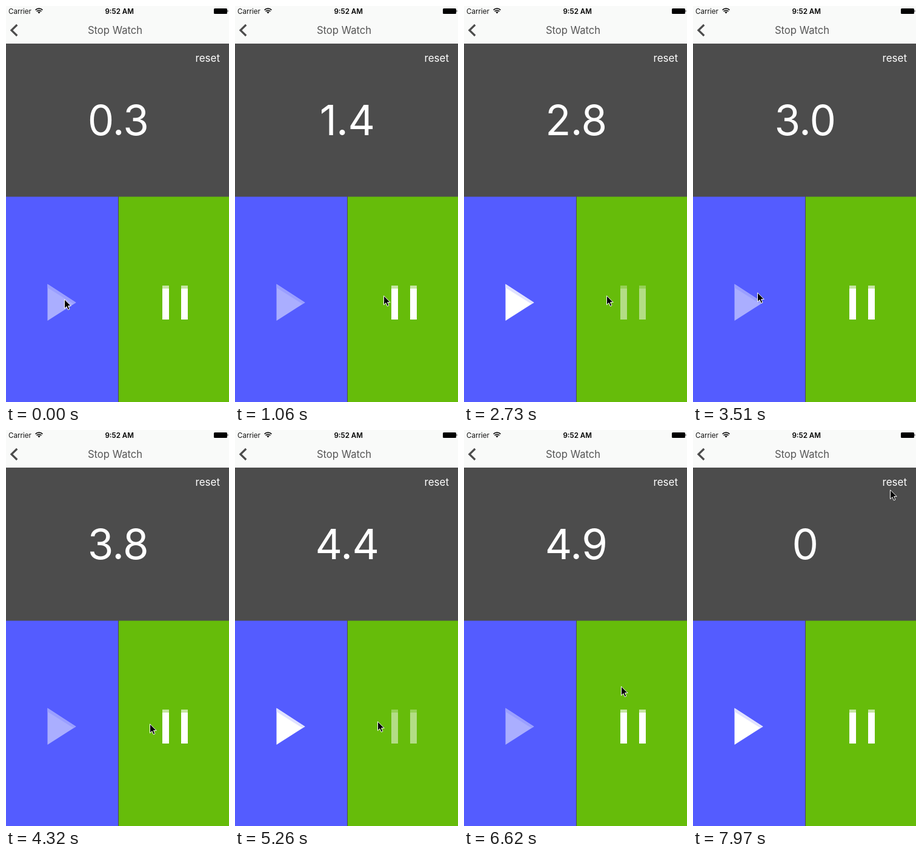
An HTML page that plays this animation: 368x653 px, repeating every 8 s.

```html
<!DOCTYPE html>
<html lang="en">
<head>
<meta charset="utf-8">
<title>Stop Watch</title>
<style>
  html, body { margin: 0; width: 100%; height: 100%; overflow: hidden; background: #4c4c4c; }
  svg { display: block; width: 100vw; height: 100vh; }
  text { font-family: Inter, Roboto, sans-serif; }
  .mid { text-anchor: middle; }
</style>
</head>
<body>
<svg viewBox="0 0 368 653" preserveAspectRatio="none">
  <rect width="368" height="653" fill="#4c4c4c"/>
  <rect width="368" height="62" fill="#f9faf9"/>

  <!-- status bar -->
  <text x="4" y="12.8" font-size="11.6" fill="#111">Carrier</text>
  <g fill="none" stroke="#111" stroke-width="1.7">
    <path d="M48.6 6.6a8.4 8.4 0 0 1 11.8 0M50.6 8.9a5.5 5.5 0 0 1 7.8 0"/>
    <path d="M52.3 10.3a3.2 3.2 0 0 1 4.4 0L54.5 12.6z" fill="#111" stroke="none"/>
  </g>
  <text class="mid" x="187.2" y="12.6" font-size="11.6" font-weight="600">9:52 AM</text>
  <rect x="343" y="4" width="22" height="9" rx="1.5"/>
  <path d="M365.6 6.5q2 1.8 0 3.6z"/>

  <!-- navigation bar -->
  <path d="M18.3 31L9 40L18.3 49" fill="none" stroke="#4c4c4c" stroke-width="3.2"/>
  <text class="mid" x="180" y="46" font-size="16.6" fill="#555">Stop Watch</text>

  <text x="353" y="92" font-size="17" fill="#fff" text-anchor="end">reset</text>
  <text id="count" class="mid" x="185" y="212.5" font-size="69" letter-spacing="-.6" fill="#fff"></text>

  <!-- buttons -->
  <rect y="314.5" width="185" height="338.5" fill="#545cff"/>
  <rect x="186" y="314.5" width="182" height="338.5" fill="#66bc0a"/>
  <g id="play">
    <path d="M68.5 458.5L115.5 489L68.5 519z" fill="#fff"/>
    <path d="M68.5 458.5L115.5 489L111.5 491.5L68.5 464.5z" fill="#e0e2ff"/>
  </g>
  <g id="pause">
    <path d="M258 461h11v56h-11zM289 461h11v56h-11z" fill="#fff"/>
    <path d="M258 461h11v5h-11zM289 461h11v5h-11z" fill="#c6e6a3"/>
  </g>

  <path id="cursor" d="M.5 .8V15.8L4 12.6L6.3 18L8.9 16.9L6.6 11.6H11.2z"
        stroke="#fff" stroke-linejoin="round"/>
</svg>
<script>
const LOOP = 8000, RESET = 7710;
const TICK = 99, LAG = 160; // ms per tenth, and from a press to its first tick
const el = id => document.getElementById(id);
const count = el("count"), play = el("play"), pause = el("pause"), cursor = el("cursor");

// Times of play and pause
const runs = [[-409, 2440], [3240, 4980], [6060, 6860]];

// Pointer moves: start, end, x, y
const home = [96, 483];
const moves = [
  [500, 850, 276, 479], [940, 1055, 245, 477],
  [2690, 2940, 106, 472], [3930, 4400, 248, 485],
  [5240, 5260, 235, 480], [5260, 5650, 118, 319], [5650, 5850, 107, 335],
  [6350, 6610, 259, 422],
  [6900, 7200, 336, 115], [7200, 7410, 325, 98]
];

const clamp = k => Math.min(1, Math.max(0, k));
const ease = k => k * k * (3 - 2 * k);

function tenths(t) {
  if (t >= RESET) return 0;
  return runs.reduce((sum, [on, off]) =>
    sum + Math.max(0, Math.floor((Math.min(t, off) - on - LAG) / TICK) + 1), 0);
}

function pointer(t) {
  return moves.reduce(([px, py], [from, to, x, y]) => {
    const k = ease(clamp((t - from) / (to - from)));
    return [px + (x - px) * k, py + (y - py) * k];
  }, home).map(Math.round);
}

function draw(t) {
  const n = tenths(t), running = runs.some(([on, off]) => t >= on && t < off);
  count.textContent = n ? (n / 10).toFixed(1) : "0";
  play.setAttribute("opacity", running ? .5 : 1);
  pause.setAttribute("opacity", running || t >= RESET ? 1 : .5);
  cursor.setAttribute("transform", `translate(${pointer(t)})`);
}

const start = performance.now();
function frame(now) {
  draw(Math.max(0, now - start) % LOOP);
  requestAnimationFrame(frame);
}
draw(0);
requestAnimationFrame(frame);
</script>
</body>
</html>
```
